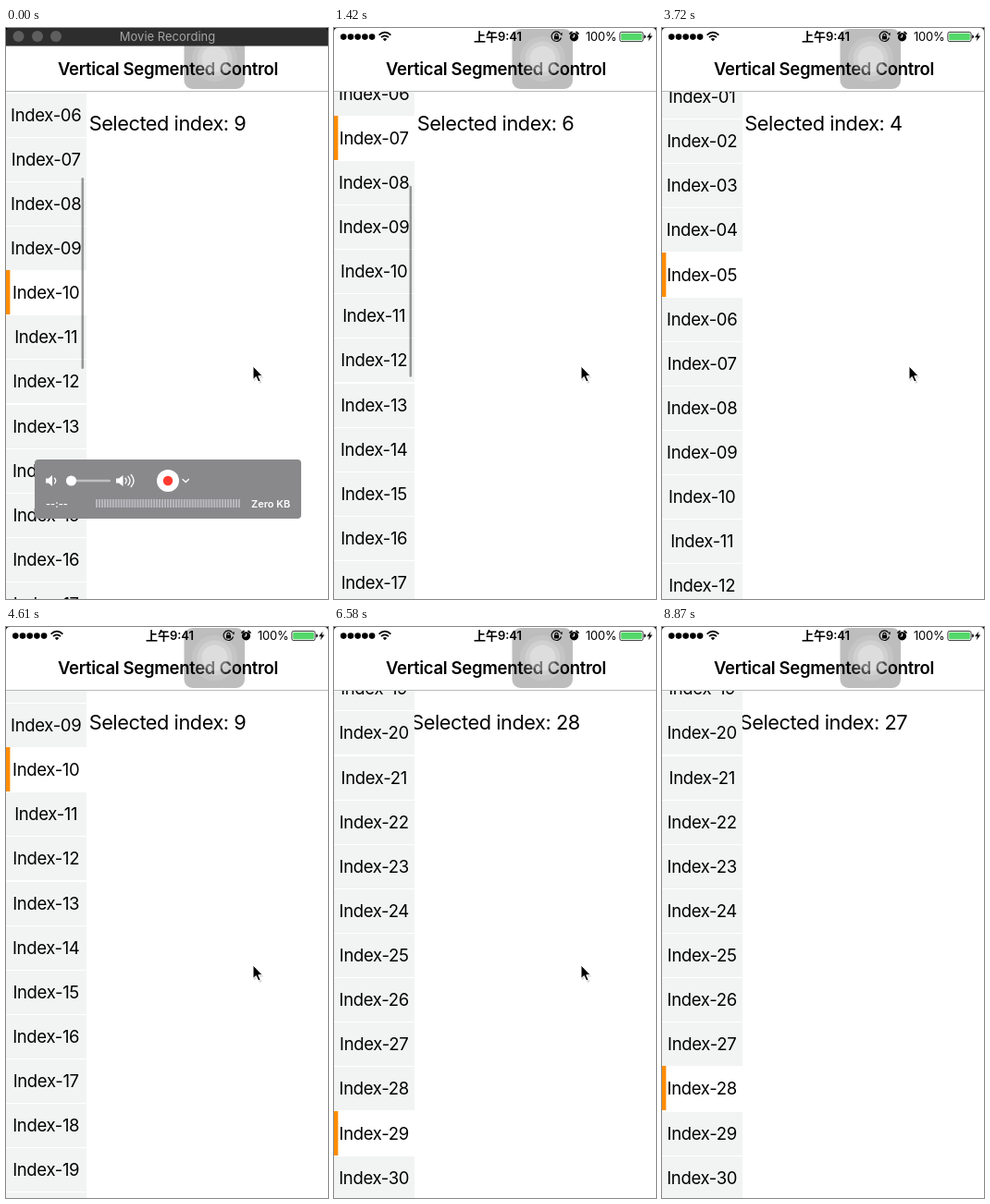
Write an HTML page that moves like this. It is 348 px wide and 618 px high and loops after 8.97 s.

```html
<!DOCTYPE html>
<html lang="en">
<head>
<meta charset="utf-8">
<title>Vertical Segmented Control</title>
<style>
  html, body { margin: 0; width: 100%; height: 100%; overflow: hidden; background: #fff; }
  svg { display: block; }
  text { font-family: Inter, "Noto Sans CJK SC", "Noto Sans CJK", sans-serif; }
  .mid { text-anchor: middle; }
  .row text { font-size: 18.5px; letter-spacing: -.34px; }
  .title { font-size: 18.5px; font-weight: 600; letter-spacing: -.31px; }
  .label { font-size: 21.75px; letter-spacing: -.45px; }
  .status { font-size: 13px; letter-spacing: -.2px; }
  .time { font-size: 13px; font-weight: 600; }
  .line { fill: none; stroke: #fff; stroke-width: 1.3; stroke-linecap: round; }
</style>
</head>
<body>
<svg id="stage" width="348" height="618" viewBox="0 0 348 618">
  <rect width="348" height="618" fill="#fff"/>
  <text id="label" class="label mid" x="174.5" y="111"></text>

  <svg x="0" y="68" width="88" height="550" overflow="hidden">
    <g id="rows"></g>
    <rect id="thumb" x="81.5" width="2.6" rx="1.3" fill="#000" fill-opacity=".38"/>
  </svg>

  <rect width="348" height="68" fill="#fff"/>
  <rect y="68" width="348" height="1" fill="#b8b8b8"/>
  <text class="title mid" x="175" y="51">Vertical Segmented Control</text>

  <g id="status">
    <g id="dots"></g>
    <g fill="none" stroke="#000" stroke-width="1.7">
      <path d="M48.6 7.6Q55 1.8 61.4 7.6M51 10.2Q55 6.6 59 10.2"/>
      <path d="M55 14.2L52.8 11.9Q55 10.2 57.2 11.9Z" fill="#000" stroke="none"/>
    </g>
    <text class="time mid" x="177" y="14">上午9:41</text>
    <g fill="none" stroke="#000" stroke-width="1.1">
      <path d="M244.5 5.8A5.3 5.3 0 1 0 245.5 10.5"/>
      <path d="M246.8 5L244.3 6.6L246.4 8.4Z" fill="#000" stroke="none"/>
      <path d="M239 8.8V7.8a1.5 1.5 0 0 1 3 0V8.8"/>
      <rect x="238" y="8.6" width="5" height="3.8" fill="#000" stroke="none"/>
    </g>
    <circle cx="259.5" cy="9.8" r="4.6"/>
    <path d="M255 6.2L257 4.4M264 6.2L262 4.4" stroke="#000" stroke-width="1.6" stroke-linecap="round"/>
    <path d="M259.5 7V10H257.3" fill="none" stroke="#fff"/>
    <text class="status" x="272" y="14">100%</text>
    <rect x="308.9" y="4.4" width="25.2" height="10.2" rx="2" fill="#fff" stroke="#222" stroke-width=".9"/>
    <rect x="310.2" y="5.7" width="22.6" height="7.6" rx="1" fill="#53d769"/>
    <path d="M335.2 7.6Q337 7.8 337 9.5T335.2 11.4Z"/>
    <path d="M342.5 4.5L338 10.2H340.8L339.6 14.5L344.2 8.6H341.3Z"/>
  </g>

  <g id="assist">
    <rect x="192.5" y="1" width="65.5" height="65" rx="9" fill="#000" fill-opacity=".26"/>
    <g fill="#fff">
      <circle cx="225.5" cy="33.5" r="24.5" fill-opacity=".12"/>
      <circle cx="225.5" cy="33.5" r="19" fill-opacity=".18"/>
      <circle cx="225.5" cy="33.5" r="14" fill-opacity=".28"/>
    </g>
  </g>

  <g id="bar">
    <rect width="348" height="19.5" fill="#2d2d2d"/>
    <g fill="#5e5e5e">
      <circle cx="13.5" cy="9" r="6"/><circle cx="34" cy="9" r="6"/><circle cx="54" cy="9" r="6"/>
    </g>
    <text class="mid" x="174.5" y="13.8" font-size="13" fill="#a5a5a5">Movie Recording</text>
  </g>
  <path d="M0 0H4Q0 0 0 4ZM348 0H344Q348 0 348 4Z"/>

  <g id="panel">
    <rect x="31" y="467" width="288" height="64" rx="4" fill="#89888b"/>
    <path d="M43 487.5H46L50 484V496L46 492.5H43Z" fill="#fff"/>
    <path class="line" d="M52.5 487.2Q55 490 52.5 492.8"/>
    <rect x="66" y="488.7" width="47" height="2.6" rx="1.3" fill="#bfbec1"/>
    <circle cx="70.5" cy="490" r="5.6" fill="#fff"/>
    <path d="M119 487.5H122L126.5 484V496L122 492.5H119Z" fill="#fff"/>
    <path class="line" d="M129 487.2Q131.5 490 129 492.8M132 485.3Q136 490 132 494.7M135.2 483.5Q141 490 135.2 496.5"/>
    <circle cx="175" cy="490" r="12" fill="#fff"/>
    <circle cx="175" cy="490" r="5.2" fill="#ff3b30"/>
    <path class="line" d="M191 488.5L194.2 491.5L197.4 488.5"/>
    <g fill="#fff" font-size="11" font-weight="600">
      <text x="43" y="519">--:--</text>
      <text x="265" y="519">Zero KB</text>
    </g>
    <g id="meter" fill="#b9b8bc"></g>
  </g>
  <ellipse id="ghost" cx="175" cy="490" rx="5.2" ry="4.2" fill="#ff3b30" fill-opacity=".06"/>

  <g id="cursor">
    <path d="M1 2V16.5L4.5 13.5L7 19L9.5 18L7 12.5H11.5Z" fill="#000" fill-opacity=".15"/>
    <path d="M0 0V14.5L3.3 11.5L5.7 17L8.2 16L5.8 10.7H10.3Z" stroke="#fff" stroke-width="1"/>
  </g>
</svg>
<script>
const LOOP = 8970, ROWS = 30, PITCH = 48.125, VIEW = 550;
const $ = id => document.getElementById(id);

function add(parent, tag, attrs, text) {
  const el = document.createElementNS('http://www.w3.org/2000/svg', tag);
  set(el, attrs);
  if (text) el.textContent = text;
  parent.appendChild(el);
  return el;
}
function set(el, attrs) {
  for (const k in attrs) el.setAttribute(k, attrs[k]);
}

// The first pixel line of each row stays white and separates it from the row above.
const rows = Array.from({ length: ROWS }, (_, i) => {
  const g = add($('rows'), 'g', { class: 'row', transform: `translate(0 ${Math.round(i * PITCH)})` });
  add(g, 'rect', { width: 87, height: 48, fill: '#fff' });
  const back = add(g, 'rect', { y: 1, width: 87, height: 47 });
  const mark = add(g, 'rect', { width: 4.4, height: 48, fill: '#ff8c00' });
  add(g, 'text', { class: 'mid', x: 43.2, y: 30.5 }, 'Index-' + String(i + 1).padStart(2, '0'));
  return { back, mark };
});
for (let i = 0; i < 5; i++) add($('dots'), 'circle', { cx: 10.3 + i * 7.7, cy: 9.6, r: 3.3 });
for (let i = 0; i < 53; i++) add($('meter'), 'rect', { x: 97 + i * 2.96, y: 510, width: 2, height: 9 });

// Each step changes only the values it lists.
const steps = [];
let last = {};
const step = (t, change) => steps.push(last = { ...last, ...change, t });

// A tap selects a row, then the list glides to its new offset.
function tap(sel, to, times, ease) {
  const from = last.y;
  times.forEach((t, i) => step(t, { sel, y: from + (to - from) * ease[i], thumb: 0 }));
}
const GLIDE = [.093, .74, 1];

step(0, { sel: 9, y: 239, thumb: 1, panel: 1, bar: 1, ghost: 0, cursor: [267, 366] });
step(170, { thumb: .5 });
step(350, { thumb: 0 });
tap(6, 6 * PITCH, [530, 700, 880], GLIDE);
step(1240, { panel: .5, bar: .5 });
step(1410, { panel: 0, bar: 0, y: 262, thumb: 1 });
step(1590, { y: 150 });
step(1770, { y: 40 });
step(1940, { y: -9 });
step(2120, { y: -2.25 });
step(2300, { y: 0 });
step(2480, { thumb: .5 });
step(2650, { thumb: 0 });
step(2830, { sel: 0 });
tap(4, 4 * PITCH, [3720, 3900, 4080], GLIDE);
tap(9, 9 * PITCH, [4430, 4610, 4790], GLIDE);
tap(15, 15 * PITCH, [5330, 5510, 5690], GLIDE);
tap(24, 892, [6040, 6220], [.6, 1]);
step(6580, { sel: 28 });
step(7280, { sel: 27 });
step(7990, { cursor: [270, 380], ghost: 1 });
step(8170, { cursor: [250, 410], ghost: 0, panel: .6, bar: .6 });
step(8340, { cursor: [214, 452], panel: 1, bar: 1 });
step(8520, { cursor: [182, 484] });
step(8700, { cursor: [176, 489] });
step(8870, { cursor: null, panel: 0, bar: 0 });

function draw(s) {
  $('label').textContent = 'Selected index: ' + s.sel;
  set($('rows'), { transform: `translate(0 ${-Math.round(s.y)})` });
  rows.forEach(({ back, mark }, i) => {
    const on = i === s.sel;
    set(back, { fill: on ? '#fff' : '#f2f3f3' });
    set(mark, { opacity: on ? 1 : 0 });
  });
  const ratio = VIEW / (ROWS * PITCH);
  set($('thumb'), { y: 3 + Math.max(0, s.y) * ratio, height: 207 + Math.min(0, s.y), opacity: s.thumb });
  for (const id of ['panel', 'bar', 'ghost']) set($(id), { opacity: s[id] });
  set($('cursor'), { opacity: s.cursor ? 1 : 0 });
  if (s.cursor) set($('cursor'), { transform: `translate(${s.cursor})` });
}

let shown;
const start = performance.now();
function tick(now) {
  const t = Math.max(0, now - start) % LOOP;
  const s = steps.findLast(k => k.t <= t);
  if (s !== shown) draw(shown = s);
  requestAnimationFrame(tick);
}
draw(shown = steps[0]);
requestAnimationFrame(tick);
</script>
</body>
</html>
```
